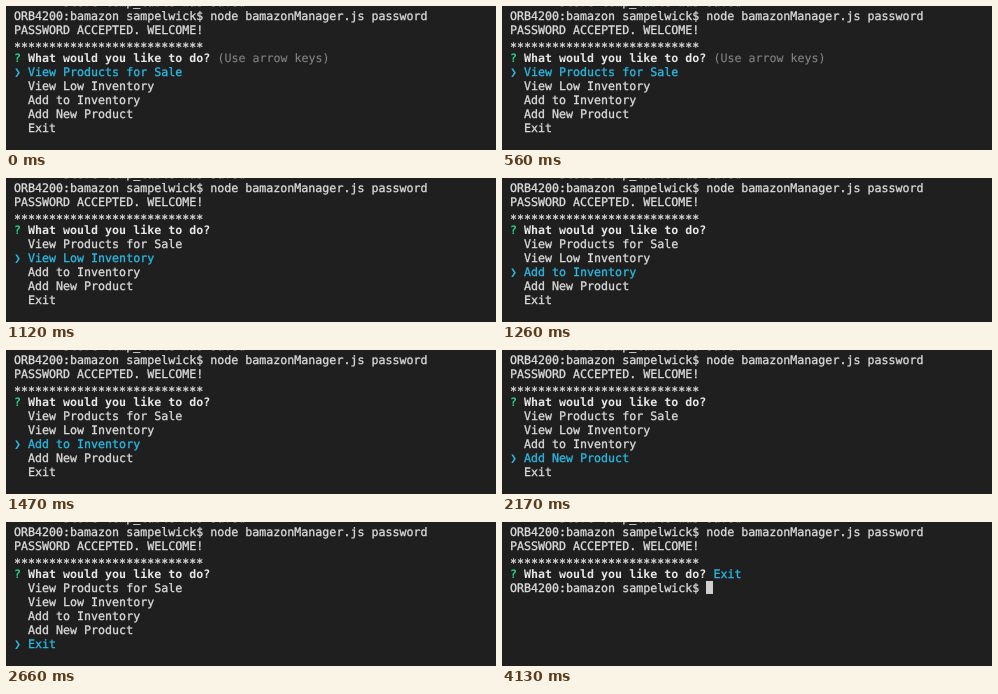
Recreate the animation shown at these times as an HTML page. Size 490 px wide and 144 px high, loop 5320 ms.

```html
<!DOCTYPE html>
<html lang="en">
<head>
<meta charset="utf-8">
<title>Terminal menu</title>
<style>
  html, body { margin: 0; width: 100%; height: 100%; overflow: hidden; background: #1f1f1f; }
  svg { display: block; width: 100%; height: 100%; }
  text {
    --ink: #dcdcdc;
    font: 11.65px "DejaVu Sans Mono", "Liberation Mono", monospace;
    fill: var(--ink);
    stroke: var(--ink);
    stroke-width: 0.3px;
    white-space: pre;
    text-rendering: geometricPrecision;
  }
  .bold, .green, .pointer { font-weight: bold; stroke-width: 0; }
  .bold { --ink: #e8e8e8; }
  .green { --ink: #23d18b; }
  .cyan { --ink: #2bb9e2; }
  .gray { --ink: #858585; stroke-width: 0.1px; }
</style>
</head>
<body>
<svg id="stage" viewBox="0 0 490 144"></svg>
<script>
const LOOP = 5320;
const LEFT = 8, BASE = 13.7, CHAR = 7.014, LINE = 14.02;
const PROMPT = "ORB4200:bamazon sampelwick$ ";
const QUESTION = "What would you like to do?";
const CHOICES = ["View Products for Sale", "View Low Inventory", "Add to Inventory", "Add New Product", "Exit"];
const MOVES = [0, 910, 1260, 1540, 2310]; // when each choice becomes active
const DONE = 4130;

const stage = document.getElementById("stage");

function add(tag, attrs, parent = stage) {
  const el = document.createElementNS("http://www.w3.org/2000/svg", tag);
  for (const key in attrs) el.setAttribute(key, attrs[key]);
  return parent.appendChild(el);
}

function write(str, col, row, cls = "", parent = stage) {
  const el = add("text", { x: LEFT + col * CHAR, y: BASE + row * LINE, class: cls }, parent);
  el.textContent = str;
  return el;
}

const show = (el, on) => el.setAttribute("visibility", on ? "visible" : "hidden");

write("store temp_table was saved", 7, -1); // scrolled off, only its lower edge shows
write(PROMPT + "node bamazonManager.js password", 0, 0);
write("PASSWORD ACCEPTED. WELCOME!", 0, 1);
write("*".repeat(27), 0, 2).setAttribute("dy", 3.2); // centred on the line
write("?", 0, 3, "green");
write(QUESTION, 2, 3, "bold");
const hint = write("(Use arrow keys)", 29, 3, "gray");

const menu = add("g", {});
const items = CHOICES.map((label, i) => write(label, 2, 4 + i, "", menu));
const pointer = write("❯", 0, 4, "cyan pointer", menu);

const answer = add("g", {});
write("Exit", 29, 3, "cyan", answer);
write(PROMPT, 0, 4, "", answer);
add("rect", { x: LEFT + PROMPT.length * CHAR - 0.4, y: BASE + 4 * LINE - 10.8, width: 7, height: 13, fill: "#cfcfcf" }, answer);

function render(t) {
  const done = t >= DONE;
  const active = MOVES.filter(start => t >= start).length - 1;
  show(hint, active === 0);
  show(menu, !done);
  show(answer, done);
  items.forEach((el, i) => el.setAttribute("class", i === active ? "cyan" : ""));
  pointer.setAttribute("y", BASE + (4 + active) * LINE);
}

const begin = performance.now();
function tick() {
  render((performance.now() - begin) % LOOP);
  requestAnimationFrame(tick);
}
tick();
</script>
</body>
</html>
```
